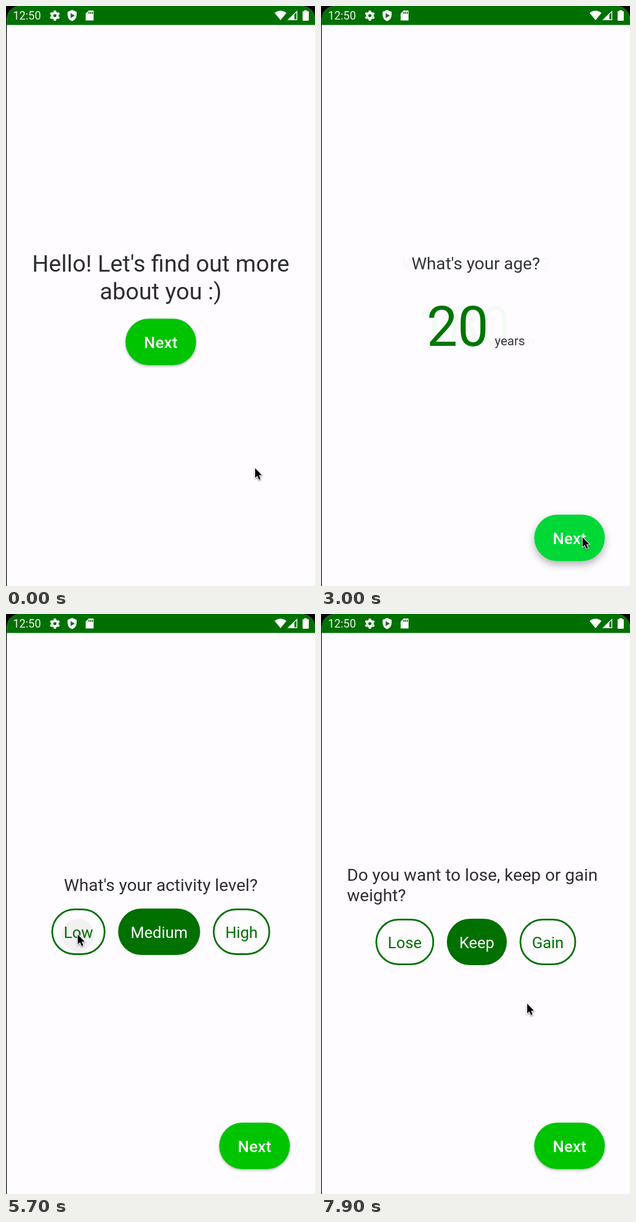
An HTML page with a canvas for the animation above (8 s loop, 547x1024 px).

```html
<!DOCTYPE html>
<html lang="en">
<head>
<meta charset="utf-8">
<title>Onboarding</title>
<style>
html, body { margin: 0; width: 100%; height: 100%; overflow: hidden; background: #000; }
canvas { display: block; width: 547px; height: 1024px; }
</style>
</head>
<body>
<canvas id="stage" width="547" height="1024"></canvas>
<script>
const c = document.getElementById('stage').getContext('2d');
const W = 547, H = 1024, MID = 274, LOOP = 8000, STEP = 100, FADE = 450;
const PAPER = '#fefcff', BAR = '#007000';
// Channels below zero keep the wide-gamut greens saturated while they fade.
const GREEN = [-115, 112, -61], INK = [46, 45, 50];
const BUTTON = { w: 125, h: 82 };
const LABEL = 27.8, PILL_PAD = 22, PILL_GAP = 22.5;
const TAP = 5700, TAP_GAP = 500;

const welcome = { at: -FADE, title: ["Hello! Let's find out more", 'about you :)'], y: 469, size: 41.3 };
const gender = { at: 1150, title: ['What is your gender?'], y: 489, pills: ['Male', 'Female'], pick: () => 0 };
const activity = {
  at: 4480, title: ["What's your activity level?"], y: 489, pills: ['Low', 'Medium', 'High'],
  pick: t => t < TAP + 100 ? 1 : Math.min(2, Math.floor((t - TAP - 100) / TAP_GAP))
};
const goal = {
  at: 7440, title: ['Do you want to lose, keep or gain', 'weight?'], y: 471, left: 46,
  pills: ['Lose', 'Keep', 'Gain'], pick: () => 1
};
const amount = (at, word, value, unit) => ({ at, title: [`What's your ${word}?`], y: 465, value, unit });
const screens = [
  welcome, gender,
  amount(2080, 'age', '20', 'years'),
  amount(2950, 'height', '180', 'cm'),
  amount(3720, 'weight', '80.0', 'kg'),
  activity, goal
];

const clamp = v => Math.max(0, Math.min(1, v));

// cubic-bezier(.4, 0, .2, 1)
function ease(x) {
  if (x <= 0 || x >= 1) return clamp(x);
  let lo = 0, hi = 1, s;
  for (let i = 0; i < 20; i++) {
    s = (lo + hi) / 2;
    const q = 1 - s;
    if (1.2 * s * q * q + 0.6 * s * s * q + s ** 3 < x) lo = s; else hi = s;
  }
  return 3 * s * s * (1 - s) + s ** 3;
}

const tint = (rgb, a) =>
  `rgb(${rgb.map(v => Math.round(Math.max(0, Math.min(255, v * a + 255 * (1 - a))))).join()})`;

function setFont(size, weight = 400) {
  c.font = `${weight} ${size}px Roboto, "Noto Sans", sans-serif`;
}

function widthOf(str, size) {
  setFont(size);
  return c.measureText(str).width;
}

function type(str, x, y, size, color, align = 'center', weight) {
  setFont(size, weight);
  c.textAlign = align;
  c.fillStyle = color;
  c.fillText(str, x, y);
}

function box(x, y, w, h, r, color) {
  c.beginPath();
  c.roundRect(x, y, w, h, r);
  if (color) {
    c.fillStyle = color;
    c.fill();
  }
}

function polygon(color, ...points) {
  c.beginPath();
  points.forEach(([x, y]) => c.lineTo(x, y));
  c.closePath();
  c.fillStyle = color;
  c.fill();
}

// A centred row of pills, each as wide as its label plus padding.
function layout(labels) {
  const widths = labels.map(l => widthOf(l, LABEL) + 2 * PILL_PAD);
  let x = MID - (widths.reduce((a, b) => a + b) + PILL_GAP * (labels.length - 1)) / 2;
  return widths.map((w, i) => {
    const p = { label: labels[i], x, w, mid: x + w / 2 };
    x += w + PILL_GAP;
    return p;
  });
}

const levels = layout(activity.pills);

// Pointer moves: start, duration, destination
const moves = [
  [0, 100, 389, 752], [200, 400, 280, 603],
  [1200, 500, 459, 952], [2100, 800, 463, 938], [3100, 1400, 458, 949],
  ...levels.map((p, i) => [i ? TAP + TAP_GAP * i - 350 : 4900, i ? 300 : 650, p.mid - 1, 566]),
  [6850, 450, 431, 928], [7450, 450, 365, 688]
];

function nextButton(x, y, a, lift, press) {
  if (a <= 0) return;
  const { w, h } = BUTTON;
  if (a === 1) {
    c.save();
    c.shadowColor = 'rgba(0,0,0,.3)';
    c.shadowBlur = 4 + 10 * press;
    c.shadowOffsetY = 2 + 4 * press;
    box(x, y, w, h, h / 2, tint([0, 196 + 20 * lift, 55 * lift], 1));
    c.restore();
  } else {
    c.globalCompositeOperation = 'darken';
    box(x, y, w, h, h / 2, tint([-60, 196, -60], a));
    c.globalCompositeOperation = 'source-over';
  }
  c.letterSpacing = '0.3px';
  type('Next', x + w / 2, y + 52, 28, '#fff', 'center', 500);
  c.letterSpacing = '0px';
}

function drawPill({ label, x, w, mid }, y, on, a) {
  const color = tint(GREEN, a), h = BUTTON.h;
  if (on) {
    box(x, y, w, h, h / 2, color);
    c.globalCompositeOperation = 'source-over';
  } else {
    box(x + 1.5, y + 1.5, w - 3, h - 3, h / 2 - 1.5);
    c.strokeStyle = color;
    c.lineWidth = 3;
    c.stroke();
  }
  type(label, mid, y + 52, LABEL, on ? PAPER : color);
  c.globalCompositeOperation = 'darken';
}

function drawAmount({ value, unit }, a) {
  const big = 97.5, small = 22.3, gap = 11;
  const w = widthOf(value, big);
  const x = MID - (w + gap + widthOf(unit, small)) / 2;
  type(value, x, 600, big, tint(GREEN, a), 'left');
  type(unit, x + w + gap, 599, small, tint(INK, a), 'left');
}

function drawScreen(s, a, t) {
  const { size = 30.4, left } = s;
  const line = Math.round(size * 1.18), last = s.y + line * (s.title.length - 1);
  c.globalCompositeOperation = 'darken';
  s.title.forEach((row, i) =>
    type(row, left || MID, s.y + i * line, size, tint(INK, a), left ? 'left' : 'center'));
  if (s.pills) layout(s.pills).forEach((p, i) => drawPill(p, last + 31, i === s.pick(t), a));
  if (s.value) drawAmount(s, a);
  c.globalCompositeOperation = 'source-over';
  if (s === welcome) nextButton(211.5, 552, a, 0, 0);
}

function statusBar() {
  const white = '#fff';
  c.fillStyle = BAR;
  c.fillRect(0, 0, W, 33.5);
  type('12:50', 12.5, 24, 19.8, '#edf5ed', 'left');

  // settings gear
  c.strokeStyle = white;
  c.lineWidth = 4.3;
  c.beginPath();
  c.arc(86.5, 17, 4.9, 0, 7);
  for (let k = 0; k < 6; k++) {
    const dx = Math.cos(k * Math.PI / 3), dy = Math.sin(k * Math.PI / 3);
    c.moveTo(86.5 + 6 * dy, 17 + 6 * dx);
    c.lineTo(86.5 + 9 * dy, 17 + 9 * dx);
  }
  c.stroke();

  // shield
  c.fillStyle = white;
  c.beginPath();
  c.moveTo(117, 7);
  c.lineTo(125, 10.2);
  c.lineTo(125, 16);
  c.quadraticCurveTo(124.5, 24, 117, 26.8);
  c.quadraticCurveTo(109.5, 24, 109, 16);
  c.lineTo(109, 10.2);
  c.fill();
  polygon(BAR, [114.5, 12.5], [121.5, 17], [114.5, 21.5]);

  // memory card
  polygon(white, [146.5, 8], [155, 8], [155, 25.5], [141, 25.5], [141, 13.5]);
  c.fillStyle = BAR;
  for (let x = 146; x < 153; x += 3) c.fillRect(x, 10, 1.6, 4);

  // wireless fan
  c.fillStyle = white;
  c.beginPath();
  c.moveTo(486, 25);
  c.lineTo(475.5, 12.2);
  c.quadraticCurveTo(486, 4.5, 496.5, 12.2);
  c.fill();

  // signal strength
  polygon(white, [498, 25], [515.5, 8], [515.5, 25]);
  polygon(BAR, [510.5, 14.8], [514, 11.5], [514, 23.5], [510.5, 23.5]);

  // battery
  c.fillStyle = white;
  c.fillRect(528, 7.5, 5, 3);
  box(525, 9, 11, 17, 1.5, white);
}

function ripples(t) {
  levels.forEach((p, i) => {
    const d = t - TAP - TAP_GAP * i;
    if (d >= 0 && d < 200) box(p.mid - 30, 538, 58, 58, 29, '#f2f0f3');
  });
}

function pointer(t) {
  let x = 441, y = 816;
  for (const [from, span, tx, ty] of moves) {
    const u = clamp((t - from) / span), k = u * u * (3 - 2 * u);
    x += (tx - x) * k;
    y += (ty - y) * k;
  }
  c.save();
  c.translate(x, y);
  c.shadowColor = 'rgba(0,0,0,.35)';
  c.shadowBlur = 3;
  c.shadowOffsetY = 1.5;
  c.lineWidth = 2;
  c.strokeStyle = '#fff';
  polygon('#000', [0, 0], [0, 17], [3.9, 13.4], [6.8, 20.2], [9.6, 19], [6.8, 12.4], [12, 12.2]);
  c.stroke();
  c.shadowColor = 'transparent';
  c.fill();
  c.restore();
}

function draw(t) {
  const n = screens.findLastIndex(s => s.at <= t);
  const since = t - screens[n].at, a = ease(since / FADE);

  c.fillStyle = '#000';
  c.fillRect(0, 0, W, H);
  c.save();
  box(1.3, 0, W - 1.3, H + 40, 24);
  c.clip();
  c.fillStyle = PAPER;
  c.fillRect(0, 0, W, H);
  statusBar();
  ripples(t);

  drawScreen(screens[n], a, t);
  if (n && a < 1) drawScreen(screens[n - 1], 1 - a, t);
  if (n) {
    const press = n > 1 ? clamp(1 - Math.abs(since - 50) / 170) : 0;
    const lift = n > 1 ? Math.max(press, 4 * a * (1 - a)) : 0;
    nextButton(377.5, 898, n === 1 ? a : 1, lift, press);
  }
  c.restore();
  pointer(t);
}

const start = performance.now();
function tick() {
  const t = (performance.now() - start) % LOOP;
  draw(Math.floor(t / STEP) * STEP);
  requestAnimationFrame(tick);
}
tick();
</script>
</body>
</html>
```
